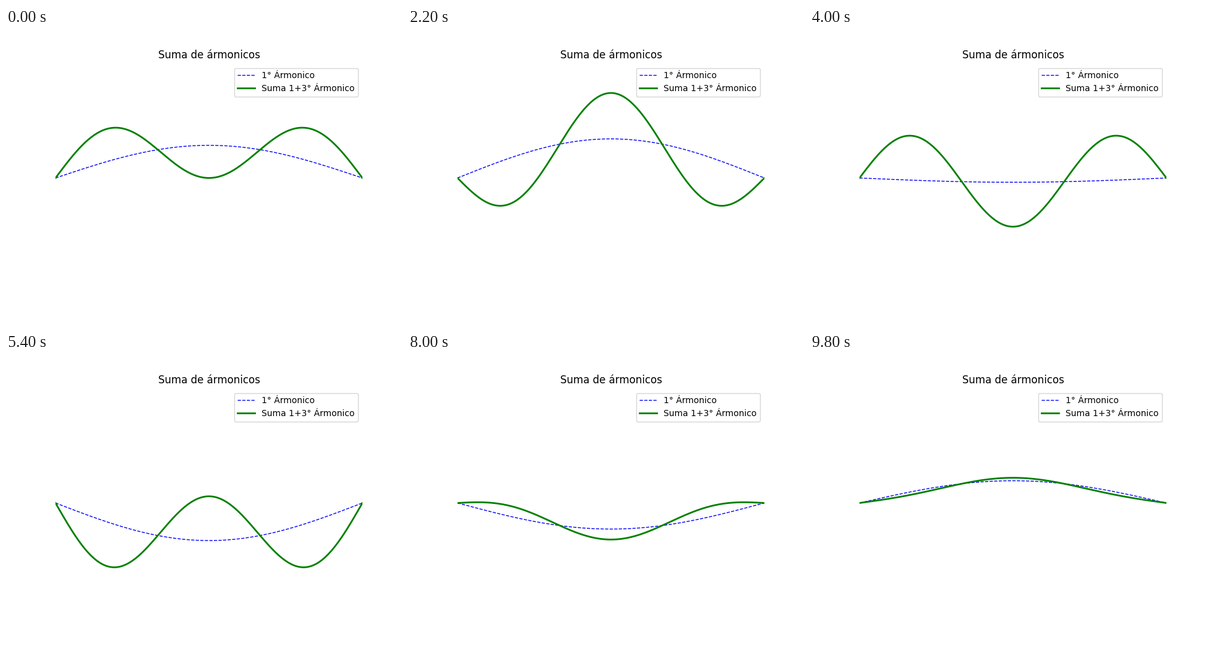
A matplotlib script for the animation above (10000 ms loop, 640 by 480 pixels).

```python
import numpy as np
import matplotlib.pyplot as plt
from matplotlib.animation import FuncAnimation

FRAMES = 50
INTERVAL = 200

x = np.linspace(0, np.pi, 200)
times = np.linspace(0, 6, FRAMES)


def harmonic(n, t):
    """Standing wave of order n on a string fixed at both ends."""
    return np.sin(n * x) * (np.cos(n * t) + np.sin(n * t))


fig, ax = plt.subplots(figsize=(6.4, 4.8), dpi=100)
ax.set_xlim(0, np.pi)
ax.set_ylim(-3.5, 3.5)
ax.axis("off")
ax.set_title("Suma de ármonicos")

first, = ax.plot(x, harmonic(1, 0), "b--", lw=1, label="1° Ármonico")
total, = ax.plot(x, harmonic(1, 0) + harmonic(3, 0), "g-", lw=2,
                 label="Suma 1+3° Ármonico")
ax.legend(loc="upper right")


def update(i):
    base = harmonic(1, times[i])
    first.set_ydata(base)
    total.set_ydata(base + harmonic(3, times[i]))
    return first, total


anim = FuncAnimation(fig, update, frames=FRAMES, interval=INTERVAL,
                     repeat=True, repeat_delay=0)
plt.show()
```
